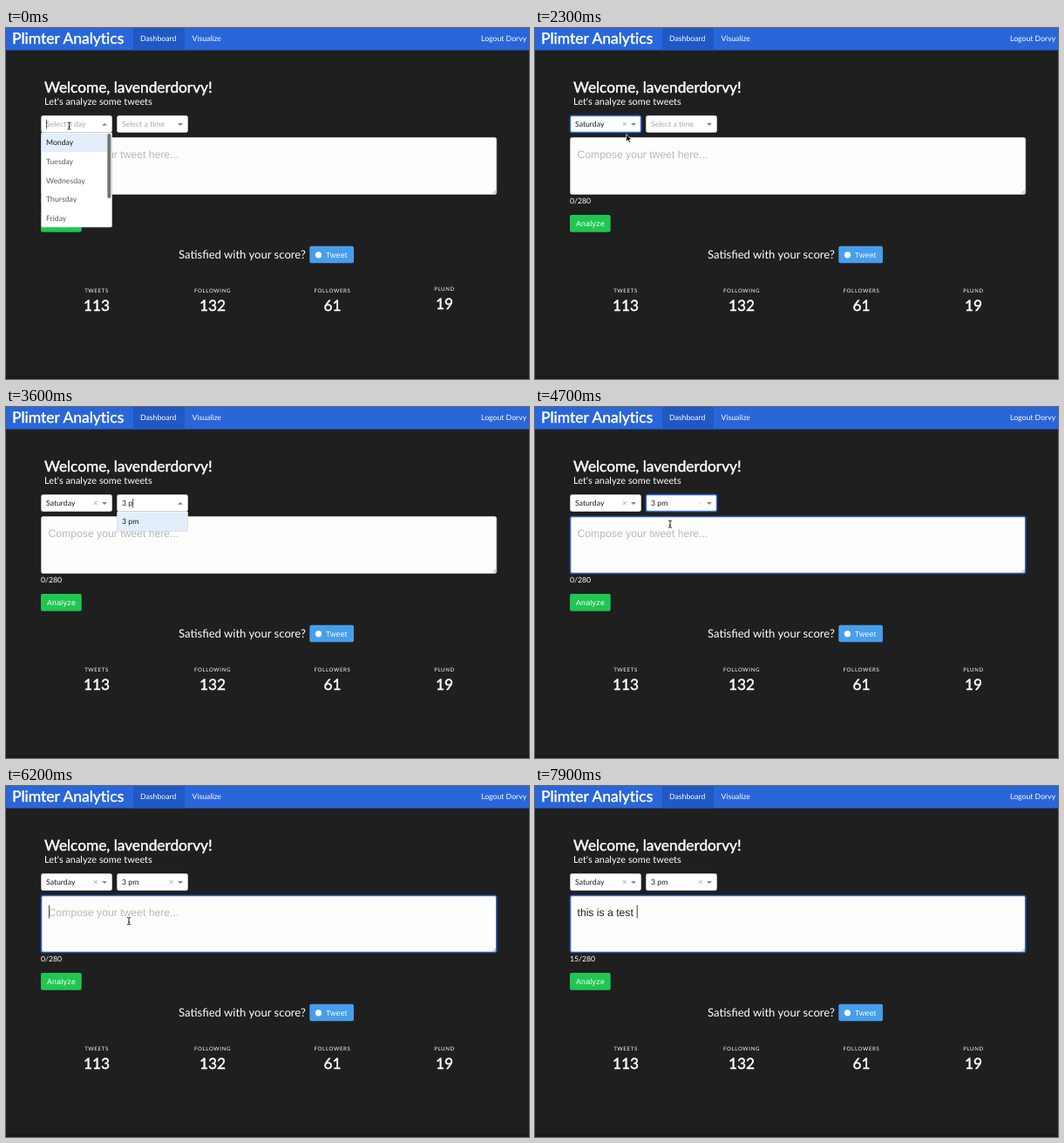
Write an HTML page that moves like this. It is 600 by 402 pixels and loops after 8000 ms.

```html
<!DOCTYPE html>
<html lang="en">
<head>
<meta charset="utf-8">
<title>Plimter Analytics</title>
<style>
  html, body { margin: 0; width: 100%; height: 100%; overflow: hidden; background: #1f1f1f; }
  svg { display: block; width: 600px; height: 402px; }
  text { font: 8.7px Lato, sans-serif; fill: #fff; white-space: pre; text-rendering: geometricPrecision; }
  .big { font-size: 17.3px; stroke: #fff; stroke-width: .45px; }
  .brand { font-size: 17.5px; font-variant-ligatures: none; }
  .sub { font-size: 10.9px; }
  .ask { font-size: 13.1px; }
  .button { font-family: "Liberation Sans", Arial, sans-serif; letter-spacing: .3px; }
  .label { font-size: 6.1px; letter-spacing: .65px; }
  .mid { text-anchor: middle; }
  .value { fill: #1c1c1c; }
  .hint { fill: #a8a8a8; }
  .item { fill: #5c5c5c; }
  .tweet { font: 12.2px "Liberation Sans", Arial, sans-serif; fill: #222; }
  .empty { fill: #b9b9b9; }
</style>
</head>
<body>
<svg viewBox="0 0 600 402">
  <rect width="600" height="402" fill="#1f1f1f"/>
  <rect y="398" width="600" height="4" fill="#1a1a1a"/>
  <rect width="600" height="25.5" fill="#2966d9"/>
  <rect x="146" width="59" height="25.5" fill="#2058c6"/>
  <text class="big brand" x="7" y="18">Plimter Analytics</text>
  <text x="154" y="15">Dashboard</text>
  <text x="213.5" y="15">Visualize</text>
  <text x="545" y="15">Logout Dorvy</text>
  <text class="big" x="44" y="73.5">Welcome, lavenderdorvy!</text>
  <text class="sub" x="44" y="87.5">Let's analyze some tweets</text>
  <rect x="40" y="214" width="46.7" height="19.7" rx="2" fill="#20c653"/>
  <text class="button" x="47" y="227.3">Analyze</text>
  <text class="ask" x="198" y="264">Satisfied with your score?</text>
  <rect x="348.3" y="249.7" width="50.7" height="19.6" rx="2" fill="#479eeb"/>
  <circle cx="358.5" cy="259.8" r="3.6" fill="#fff"/>
  <text class="button" x="366.9" y="262.8">Tweet</text>
  <g id="live"></g>
</svg>
<script>
const LOOP = 8000;
const STATS = [['TWEETS', 113, 104], ['FOLLOWING', 132, 237], ['FOLLOWERS', 61, 374.5], ['PLUND', 19, 503]];
const DAYS = ['Monday', 'Tuesday', 'Wednesday', 'Thursday', 'Friday', 'Saturday', 'Sunday'];
const HOURS = ['am', 'pm'].flatMap(half => [12, 1, 2, 3, 4, 5, 6, 7, 8, 9, 10, 11].map(h => `${h} ${half}`));
const MESSAGE = 'this is a test ';
const KEY_TIMES = [6300, 6400, 6500, 6600, 6700, 6800, 6900, 7000, 7100, 7200, 7400, 7500, 7700, 7800, 7900];

// Pointer visits: each run is a list of [time, x, y]; it stays hidden between runs.
const POINTER_RUNS = [
  [[0, 72.5, 112], [900, 72.5, 112]],
  [[1700, 72.5, 112], [2300, 104.7, 121.5], [2500, 107, 121.5], [2800, 150, 111], [3300, 150, 111]],
  [[4300, 150, 111], [4700, 155, 134], [5100, 141, 154.5], [6300, 141, 154.5]]
];

const pen = document.createElement('canvas').getContext('2d');
const measure = (string, font) => { pen.font = font; return pen.measureText(string).width; };
const within = (t, from, to) => t >= from && t < to;
const text = (x, y, cls, string) => `<text x="${x}" y="${y}" class="${cls}">${string}</text>`;
const rect = (x, y, w, h, fill, extra = '') =>
  `<rect x="${x}" y="${y}" width="${w}" height="${h}" fill="${fill}" ${extra}/>`;

// The last column starts slightly raised and settles into line.
function stats(t) {
  const lift = 2 * Math.min(1, Math.max(0, (400 - t) / 300));
  return STATS.map(([label, count, x], i) => {
    const dy = i === STATS.length - 1 ? -lift : 0;
    return text(x, 303 + dy, 'label mid', label) + text(x, 324.3 + dy, 'big mid', count);
  }).join('');
}

function menu(x, items) {
  const shown = items.slice(0, 5);
  const height = Math.min(shown.length * 21.8 + .5, 108);
  let out = rect(x + .5, 119.5, 81, height + .5, '#fff', 'rx="1.5" stroke="#ccc" stroke-width=".7"')
    + rect(x + .8, 120.5, 80.4, 21.5, '#e3eefa');
  shown.forEach((item, i) => {
    out += text(x + 6, +(134 + i * 21.8).toFixed(1), i ? 'item' : 'value', item);
  });
  if (items.length > 5) out += rect(x + 76.3, 121, 4, 74, '#747474', 'rx="2"');
  return out;
}

function select(x, { hint, typed, value, open, focus, caret, clearColor }) {
  const border = focus ? 'stroke="#2f6fe4" stroke-width="1.4"' : 'stroke="#ccc" stroke-width=".8"';
  let out = rect(x + .5, 100.5, 81, 19, '#fff', `rx="2" ${border}`);
  out += value || typed ? text(x + 6, 113, 'value', value || typed) : text(x + 6, 113, 'hint', hint);
  if (caret) out += rect(x + 6.2 + measure(typed, '8.7px Lato, sans-serif'), 105, .8, 10.5, '#222');
  if (value) out += `<path d="M${x + 60.7} 108l4 4m0-4l-4 4" stroke="${clearColor}" stroke-width=".8"/>`;
  const tip = open ? 'l3-3l3 3z' : 'l3 3l3-3z';
  return out + `<path d="M${x + 70} ${open ? 111.8 : 109}${tip}" fill="#888"/>`;
}

function compose(t) {
  const focus = t >= 4700;
  const count = KEY_TIMES.filter(key => t >= key).length;
  const typed = MESSAGE.slice(0, count);
  let out = rect(40.5, 125.5, 522.2, 65, '#fdfdfd',
    focus ? 'rx="2" stroke="#2b62c4" stroke-width="1.5"' : 'rx="2" stroke="#ccc" stroke-width=".8"');
  out += '<path d="M558.5 189.5l3.5-3.5m-1.5 3.5l1.5-1.5" stroke="#888" stroke-width=".7"/>';
  out += count ? text(48.5, 148.8, 'tweet', typed) : text(48.5, 148.8, 'tweet empty', 'Compose your tweet here...');
  if (within(t, 5200, 5700) || t >= 6200) {
    const width = measure(typed, '12.2px "Liberation Sans", Arial, sans-serif');
    out += rect(49 + width, 136.5, .9, 15, '#333');
  }
  return out + text(40, 200.6, '', `${count}/280`);
}

function pointer(t) {
  const run = POINTER_RUNS.find(r => within(t, r[0][0], r.at(-1)[0]));
  if (!run) return '';
  const next = run.findIndex(point => point[0] > t);
  const [t0, x0, y0] = run[next - 1], [t1, x1, y1] = run[next];
  const u = (t - t0) / (t1 - t0), ease = u * u * (3 - 2 * u);
  const x = x0 + (x1 - x0) * ease, y = y0 + (y1 - y0) * ease;
  const overText = y > 125 || (y < 120 && (x < 100 || within(x, 128, 185)));
  const at = `transform="translate(${x.toFixed(2)} ${y.toFixed(2)})"`;
  if (!overText)
    return `<path ${at} d="M0 0v8.6l2-1.8l1.4 3l1.5-.7l-1.4-2.9h2.7z" fill="#000" stroke="#fff" stroke-width=".7"/>`;
  const beam = 'd="M-2-4Q0-4 0-3Q0-4 2-4M0-3V3.2M-2 4.2Q0 4.2 0 3.2Q0 4.2 2 4.2M-1 1.3H1" fill="none"';
  return `<g ${at}><path ${beam} stroke="#fff" stroke-width="2"/><path ${beam} stroke="#222" stroke-width="1"/></g>`;
}

function render(t) {
  const day = t < 900 ? '' : t < 1200 ? 's' : 'sa';
  const hour = t < 3300 ? '' : t < 3500 ? '3' : t < 3600 ? '3 ' : '3 p';
  const dayOpen = t < 1600, hourOpen = within(t, 2800, 3900);
  const matches = (list, query) => list.filter(item => item.toLowerCase().includes(query));

  let out = stats(t) + compose(t);
  out += select(40, {
    hint: 'Select a day', typed: day, value: dayOpen ? '' : 'Saturday', open: dayOpen,
    focus: within(t, 1600, 2800), caret: dayOpen && !within(t, 400, 900), clearColor: '#999'
  });
  out += select(127, {
    hint: 'Select a time', typed: hour, value: t < 3900 ? '' : '3 pm', open: hourOpen,
    focus: within(t, 3900, 4800), caret: hourOpen, clearColor: t < 4800 ? '#ddd' : '#999'
  });
  if (dayOpen) out += menu(40, matches(DAYS, day));
  if (hourOpen) out += menu(127, matches(HOURS, hour));
  return out + pointer(t);
}

const live = document.getElementById('live');
let last = '';
function tick() {
  const markup = render(performance.now() % LOOP);
  if (markup !== last) live.innerHTML = last = markup;
  requestAnimationFrame(tick);
}
tick();
</script>
</body>
</html>
```
